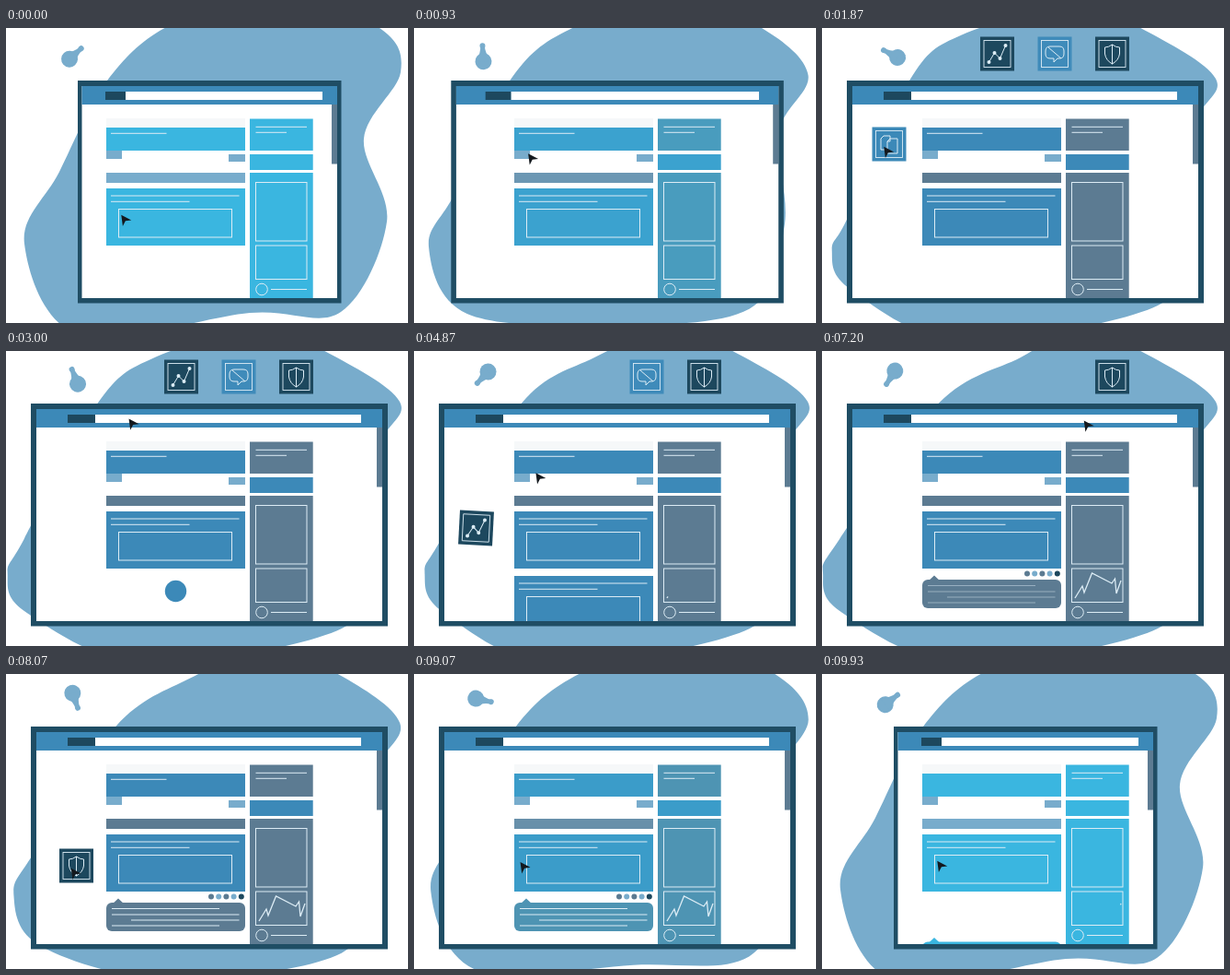
Recreate the animation shown at these times as an HTML page. Size 437 by 320 pixels, loop 9990 ms.

```html
<!DOCTYPE html>
<html lang="en">
<head>
<meta charset="utf-8">
<title>Page builder</title>
<style>
html, body { margin: 0; width: 100%; height: 100%; overflow: hidden; background: #fff; }
svg { display: block; width: 100vw; height: 100vh; }
.ln { fill: none; stroke: #dcecf5; stroke-width: 1; }
.thin { fill: none; stroke: #dcecf5; stroke-width: .9; }
</style>
</head>
<body>
<svg viewBox="0 0 437 320" xmlns="http://www.w3.org/2000/svg">
  <defs>
    <clipPath id="page"><rect x="0" y="83" width="437" height="210"/></clipPath>
    <g id="cardLines" class="ln">
      <path d="M114 182H253.500M114 188.300H199.500"/>
      <rect x="122.500" y="196.500" width="123" height="30.500"/>
    </g>
    <g id="tile">
      <rect x="-18.500" y="-18.500" width="37" height="37"/>
      <rect x="-14.500" y="-14.500" width="29" height="29" class="thin"/>
    </g>
  </defs>
  <g fill="#78accc">
    <path id="blob"/>
    <g id="drop">
      <circle cx="8" r="9"/>
      <circle cx="-9" r="3"/>
      <path d="M8 -8Q-2 -2 -9 -2.400V2.400Q-2 2 8 8z"/>
    </g>
  </g>

  <rect id="frame" y="57" height="241.500" fill="#1f4d64"/>
  <rect id="paper" y="63" height="230" fill="#fff"/>
  <rect id="toolbar" y="63" height="20" fill="#3c89b8"/>
  <rect id="tab" y="69" height="9" fill="#1d485e"/>
  <rect id="field" y="69" height="9" fill="#fff"/>
  <rect id="thumb" y="83" height="64.500" fill="#5c7b92"/>

  <g clip-path="url(#page)">
    <rect x="109" y="98" width="151" height="10" fill="#f6f8f9"/>
    <rect x="109" y="108" width="151" height="25" class="main"/>
    <path id="title" class="ln" d="M114 114.300H174.500" pathLength="1"/>
    <path d="M109 133h17v9h-17zM242 137h18v8h-18z" fill="#78accc"/>
    <rect x="109" y="157" width="151" height="11" id="bar"/>
    <g id="dots"></g>
    <rect x="109" y="174" width="151" height="62" class="main"/>
    <use href="#cardLines"/>

    <rect x="265" y="98.500" width="68.700" height="34.500" class="side"/>
    <path class="ln" d="M271.500 107.300H327M271.500 113.300H305"/>
    <rect x="265" y="137" width="68.700" height="17" class="main"/>
    <rect x="265" y="157" width="68.700" height="136" class="side"/>
    <g class="ln">
      <rect x="271.500" y="167.500" width="55.500" height="63.500"/>
      <rect x="271.500" y="236" width="55.500" height="36.500"/>
      <circle cx="278" cy="283.500" r="6.300"/>
      <path d="M288 283.500H327"/>
    </g>
    <path id="graph" class="ln" style="stroke-width:1.300" pathLength="1"
      d="M275 268L283 255L285 262L293.500 241L315 252L318.500 247L320 263L325 249"/>

    <g id="copyCard">
      <rect id="copyBox" class="main"/>
      <use id="copyLines" href="#cardLines" y="70"/>
    </g>
    <g id="bubble">
      <path id="nib" class="side" d="M115 250L122 243.500L129 250z"/>
      <rect id="bubbleBox" class="side"/>
      <path id="bubbleLines" class="ln" d="M115 254.500H232M115 261H253.500M136 267H253.500M115 273H232"/>
    </g>
  </g>

  <g id="copy">
    <use href="#tile" fill="#3c89b8"/>
    <path class="ln" d="M-2 6H-9V-6L-6 -9H1V-6M-2 -3L1 -6H9V10H-2zM1 -6V-3H-2"/>
  </g>
  <g id="chart">
    <use href="#tile" fill="#1d485e"/>
    <path class="ln" d="M-9 9L-3 -1L3 5L9 -9"/>
    <path d="M-9 9h0M-3 -1h0M3 5h0M9 -9h0" stroke="#dcecf5" stroke-width="4" stroke-linecap="round"/>
  </g>
  <g id="chat">
    <use href="#tile" fill="#3f8bba"/>
    <path class="ln" d="M-5 -8H5Q10 -8 10 -3V0Q10 5 5 5H3L-1 9V5H-5Q-10 5 -10 0V-3Q-10 -8 -5 -8zM-7 -7L7 5"/>
  </g>
  <g id="shield">
    <use href="#tile" fill="#1d485e"/>
    <path class="ln" d="M0 -10Q4 -7 8 -7V0Q7 7 0 11Q-7 7 -8 0V-7Q-4 -7 0 -10zM0 -10V11"/>
  </g>
  <path id="cursor" d="M6.500 0L-4.500 -5.700L-1.500 0L-4.500 5.700z" fill="#14191e"/>
</svg>

<script>
const LOOP = 9990, STEP = 66.6;
const $ = id => document.getElementById(id);
const set = (el, attrs) => { for (const k in attrs) el.setAttribute(k, attrs[k]); };
const span = (id, x1, x2) => set($(id), { x: x1, width: x2 - x1 });
const lerp = (a, b, u) => a + (b - a) * u;
const ramp = (t, a, b) => {
  const u = Math.min(1, Math.max(0, (t - a) / (b - a)));
  return u * u * (3 - 2 * u);
};
const blend = (a, b, u) => a.map((v, i) => lerp(v, b[i], u));
const mix = (a, b, u) => `rgb(${blend(a, b, u).map(Math.round)})`;

const CYAN = [58, 182, 224], BLUE = [60, 137, 184], SLATE = [92, 123, 146], SKY = [120, 172, 204];
const DOTS = ['#5c7b92', '#78accc', '#5c7b92', '#78accc', '#1d485e'];

// Backdrop outline, clockwise from where it meets the window's top edge
const HOME = [[110, 57], [180, -4], [300, -40], [406, 0], [429, 48], [389, 120],
  [414, 210], [364, 308], [265, 309], [80, 333], [20, 234], [58, 156]];
const WIDE = [[111, 57], [185, 7], [280, -24], [350, 2], [428, 55], [405, 106],
  [390, 220], [365, 301], [150, 338], [28, 284], [7, 242], [25, 204]];

function backdrop(t) {
  const home = 1 - ramp(t, 0, 1.8) + ramp(t, 7.2, 9.9);
  const lean = -16 * Math.cos(.63 * (t - 1.8));
  const sway = -6 * Math.cos(Math.PI / 2 * (t - 3.3));
  return WIDE.map(([x, y], i) => {
    if (i < 2) x += lean * (i + 1);
    if (i > 8) x += sway;
    return blend([x, y], HOME[i], home);
  });
}

function closed(pts) {
  const n = pts.length, pt = i => pts[(i + n) % n];
  let d = 'M' + pts[0];
  pts.forEach((b, i) => {
    const a = pt(i - 1), c = pt(i + 1), e = pt(i + 2);
    const h1 = b.map((p, k) => p + (c[k] - a[k]) / 6);
    const h2 = c.map((p, k) => p - (e[k] - b[k]) / 6);
    d += `C${h1} ${h2} ${c}`;
  });
  return d + 'z';
}

// The droplet swings between these angles
const SWING = [[0, 138], [1.87, 27], [3, 68], [4.87, -47], [6.13, 7], [8.07, -110], [9.99, -222]];
function swing(t) {
  const i = SWING.findIndex(k => t < k[0]);
  const [a, from] = SWING[i - 1], [b, to] = SWING[i];
  return lerp(from, to, (t - a) / (b - a));
}

// Each icon waits in its slot, is dragged to x, y and shrinks at `gone`
const ICONS = [
  { id: 'copy', x: 73, y: 126, gone: 2.55 },
  { id: 'chart', x: 67.5, y: 192, gone: 4.95, turn: 3 },
  { id: 'chat', x: 184, y: 263.5, gone: 6.4 },
  { id: 'shield', x: 76.5, y: 208, gone: 8.4 }
];
const DRAG = .35, LINGER = .9, REST = [129, 208];

function drawIcons(t) {
  let hand = REST;
  ICONS.forEach(({ id, x, y, gone, turn = 0 }, i) => {
    const slot = 128 + 62.5 * i, grab = 1.5 + 2 * i, late = .85 + i * .1;
    const drag = ramp(t, grab, grab + DRAG);
    const start = [slot, lerp(-25, 28, ramp(t, late, late + .35))];
    const at = blend(start, [x, y], drag), size = 1 - ramp(t, gone, gone + .25);
    set($(id), { transform: `translate(${at}) rotate(${turn * drag}) scale(${size})` });
    hand = blend(hand, [slot - 2, 36], ramp(t, grab - 2 + LINGER, grab));
    hand = blend(hand, [x - 2, y + 8], drag);
  });
  hand = blend(hand, REST, ramp(t, 8.4, 9.3));
  set($('cursor'), { transform: `translate(${hand}) rotate(-125)` });
}

// A disc that swells, then stretches into a box
function grow(el, cx, cy, box, corner, pop, open) {
  const s = 11.7 * pop, [x, y, w, h] = box;
  set(el, {
    x: lerp(cx - s, x, open), y: lerp(cy - s, y, open),
    width: lerp(2 * s, w, open), height: lerp(2 * s, h, open), rx: lerp(s, corner, open)
  });
}

$('dots').innerHTML = DOTS.map((c, i) => `<circle cx="${223 + i * 8.2}" r="3" fill="${c}"/>`).join('');
const dots = [...$('dots').children];
const mains = [...document.querySelectorAll('.main')], sides = [...document.querySelectorAll('.side')];

function drawWindow(t) {
  const w = ramp(t, .4, 1.1) - ramp(t, 9.05, 9.7);
  span('frame', 78 - 51 * w, 364.5 + 50.5 * w);
  span('paper', 82.5 - 49.5 * w, 360 + 49 * w);
  span('toolbar', 82.5 - 49.5 * w, 360 + 49 * w);
  span('tab', 108 - 41 * w, 130 - 33 * w);
  span('field', 130 - 33 * w, 344 + 42 * w);
  span('thumb', 354 + 49 * w, 360 + 49 * w);

  const tone = ramp(t, .5, 1.3) - ramp(t, 8.7, 9.5);
  mains.forEach(el => set(el, { fill: mix(CYAN, BLUE, tone) }));
  sides.forEach(el => set(el, { fill: mix(CYAN, SLATE, tone) }));
  set($('bar'), { fill: mix(SKY, SLATE, tone) });
}

function drawContent(t) {
  const title = 1 - ramp(t, 9.3, 9.8);
  set($('title'), { 'stroke-dasharray': `${title} 2`, opacity: title > 0 ? 1 : 0 });

  grow($('copyBox'), 184.5, 260.5, [109, 244, 151, 62], 0, ramp(t, 2.6, 2.9), ramp(t, 3.05, 3.5));
  set($('copyLines'), { opacity: ramp(t, 3.4, 3.7) });
  set($('copyCard'), { transform: `translate(0 ${55 * ramp(t, 5.15, 5.65)})` });

  dots.forEach((el, i) => {
    const lag = i * .08, rise = ramp(t, 5.6 + lag, 5.85 + lag) - ramp(t, 9.2 + lag, 9.6 + lag);
    const hop = Math.sin(Math.PI * ramp(t, 5.7 + lag, 6.1 + lag));
    set(el, { cy: 231 + 10.5 * rise - 2 * hop });
  });

  const from = ramp(t, 9.3, 9.97), shown = Math.max(0, ramp(t, 4.7, 6.7) - from);
  set($('graph'), { 'stroke-dasharray': `0 ${from} ${shown} 2`, opacity: shown > 0 ? 1 : 0 });

  const talk = ramp(t, 6.65, 7.1);
  grow($('bubbleBox'), 184.5, 263.5, [109, 248, 151, 31], 6, ramp(t, 6.4, 6.65), talk);
  set($('nib'), { opacity: talk === 1 ? 1 : 0 });
  set($('bubbleLines'), { opacity: ramp(t, 7.05, 7.35) });
  set($('bubble'), { transform: `translate(0 ${43 * ramp(t, 9.2, 9.97)})` });
}

function draw(t) {
  set($('blob'), { d: closed(backdrop(t)) });
  set($('drop'), { transform: `translate(75 28.300) rotate(${swing(t)})` });
  drawWindow(t);
  drawContent(t);
  drawIcons(t);
}

function tick() {
  const ms = performance.now() % LOOP;
  draw(Math.floor(ms / STEP) * STEP / 1000);
  requestAnimationFrame(tick);
}
tick();
</script>
</body>
</html>
```
